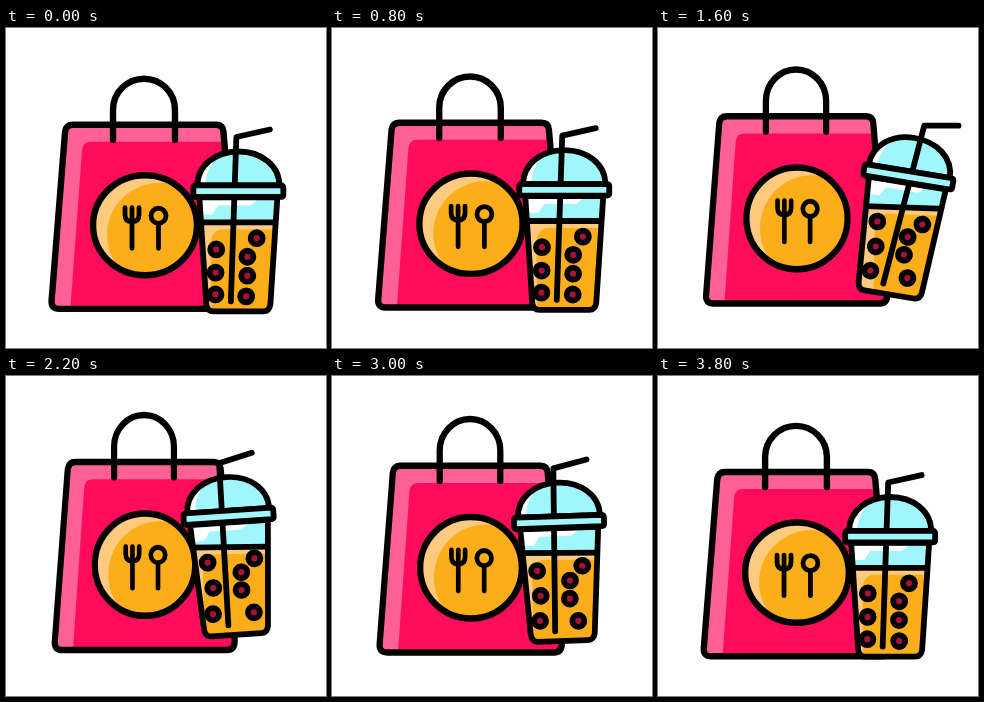
Write an HTML page that moves like this. It is 320 by 320 pixels and loops after 4 s.

```html
<!DOCTYPE html>
<html lang="en">
<head>
<meta charset="utf-8">
<title>Takeaway bag and bubble tea</title>
<style>
html, body { margin: 0; width: 100%; height: 100%; overflow: hidden; background: #fefefe; }
svg { display: block; width: 100%; height: 100%; }
.ink { fill: none; stroke: #000; stroke-linecap: round; stroke-linejoin: round; stroke-width: 6.4; }
.thin { stroke-width: 4.8; }
.mid { stroke-width: 5.8; }
</style>
</head>
<body>
<svg viewBox="0 0 320 320">
  <defs>
    <path id="bagShape" d="M67 97H210Q217 97 217.500 104L232 272Q232 281 224 281H53Q45 281 45.500 273L59 104Q60 97 67 97Z"/>
    <path id="cupShape" d="M-39-114L-32-7Q-31 0-25 0H25Q31 0 32-7L39-114Z"/>
    <path id="domeShape" d="M-41-126C-41-146-23-160 0-160S41-146 41-126Z"/>
    <clipPath id="bagClip"><use href="#bagShape"/></clipPath>
    <clipPath id="badgeClip"><ellipse cx="139" cy="197.500" rx="52" ry="50"/></clipPath>
    <clipPath id="cupClip"><use href="#cupShape"/></clipPath>
    <clipPath id="domeClip"><use href="#domeShape"/></clipPath>
  </defs>

  <g id="bag">
    <use href="#bagShape" fill="#ff6196"/>
    <path clip-path="url(#bagClip)" fill="#ff0d5c" d="M85 114H225L240 285H64L76 122Q77 114 85 114Z"/>
    <use href="#bagShape" class="ink"/>
    <path class="ink" d="M107 112V82A31 31 0 0 1 169 82V112"/>
    <g clip-path="url(#badgeClip)">
      <rect x="80" y="140" width="116" height="112" fill="#fdca7e"/>
      <ellipse cx="154" cy="207" rx="53" ry="52" fill="#fbae1a"/>
    </g>
    <ellipse class="ink" cx="139" cy="197.500" rx="52" ry="50"/>
    <path class="ink thin" d="M119 180V187Q119 194 126 194T133 187V180M126 180V220.500M152.500 196V220.500"/>
    <circle class="ink thin" cx="152.500" cy="188" r="7.500"/>
  </g>

  <g id="cup">
    <g clip-path="url(#cupClip)">
      <rect x="-45" y="-116" width="90" height="120" fill="#9ff7fb"/>
      <path d="M-40-114H22L12-106H-20L-26-97H-40Z" fill="#fff"/>
      <g id="liquid">
        <rect x="-55" y="-89" width="110" height="110" fill="#fbae1a"/>
        <path d="M-55-89H55V-82H-18Q-27-80-28-68L-27 0H-55Z" fill="#fdca7e"/>
        <path class="ink mid" d="M-50-89H50"/>
      </g>
    </g>
    <g id="pearls"></g>
    <use href="#cupShape" class="ink mid"/>
    <use href="#domeShape" fill="#9ff7fb"/>
    <path clip-path="url(#domeClip)" fill="#fff" d="M-45-126V-162H-8Q-32-152-33-126Z"/>
    <use href="#domeShape" class="ink mid"/>
    <path id="straw" class="ink mid" d="M-7.500-10L-2-174.500L31.500-182"/>
    <rect class="ink mid" x="-45" y="-126" width="90" height="11.500" rx="2" style="fill:#9ff7fb"/>
  </g>
</svg>
<script>
const LOOP = 4000, STEP = 200;
const byId = id => document.getElementById(id);
const bag = byId("bag"), cup = byId("cup"), straw = byId("straw"), liquid = byId("liquid");

// x, y in the cup at rest, then the drift at the top of the float
const pearls = [
  [-22, -61, -2, -14], [18, -73, 5, -3], [9, -54, 0, -9], [-23, -38, 3, -11],
  [9, -35, -1, -10], [-23, -16.5, 1, -6], [7, -14.5, 12, -7]
].map(data => {
  const node = document.createElementNS("http://www.w3.org/2000/svg", "circle");
  node.setAttribute("r", 6);
  node.setAttribute("class", "ink mid");
  node.style.fill = "#a8123a";
  byId("pearls").append(node);
  return { node, data };
});

const smooth = (a, b, t) => {
  const k = Math.min(1, Math.max(0, (t - a) / (b - a)));
  return k * k * (3 - 2 * k);
};
const float = (t, start) => (1 - Math.cos(2 * Math.PI * (t - start) / LOOP)) / 2;

// Lean back, swing forward, then a damped wobble
function tilt(t) {
  if (t < 1200) return -3 * smooth(1000, 1200, t);
  if (t < 1640) return -3 + 12.6 * smooth(1200, 1640, t);
  const age = t - 1680;
  return 9.8 * Math.exp(-age / 900) * Math.cos(2 * Math.PI * age / 830) * (1 - smooth(3350, 3800, t));
}

function draw(t) {
  const rise = float(t, 200), lift = float(t, 340), angle = tilt(t);
  bag.setAttribute("transform",
    `translate(138.5 ${281 - 7 * rise}) scale(${1 - 0.035 * rise} ${1 + 0.022 * rise}) translate(-138.5 -281)`);
  cup.setAttribute("transform",
    `translate(${232.5 - 2 * lift} ${285.2 - 26.8 * lift}) rotate(${angle}) scale(1 ${1 - 0.013 * lift})`);
  straw.setAttribute("transform", `rotate(${angle * 0.35} -8 -10)`);
  // The drink stays nearly level while the cup tips
  liquid.setAttribute("transform", `rotate(${-angle * 0.8} 0 -89)`);
  for (const { node, data: [x, y, dx, dy] } of pearls) {
    node.setAttribute("cx", x + dx * lift);
    node.setAttribute("cy", y + dy * lift);
  }
}

const start = performance.now();
function tick() {
  const t = (performance.now() - start) % LOOP;
  draw(Math.floor(t / STEP) * STEP);
  requestAnimationFrame(tick);
}
tick();
</script>
</body>
</html>
```
